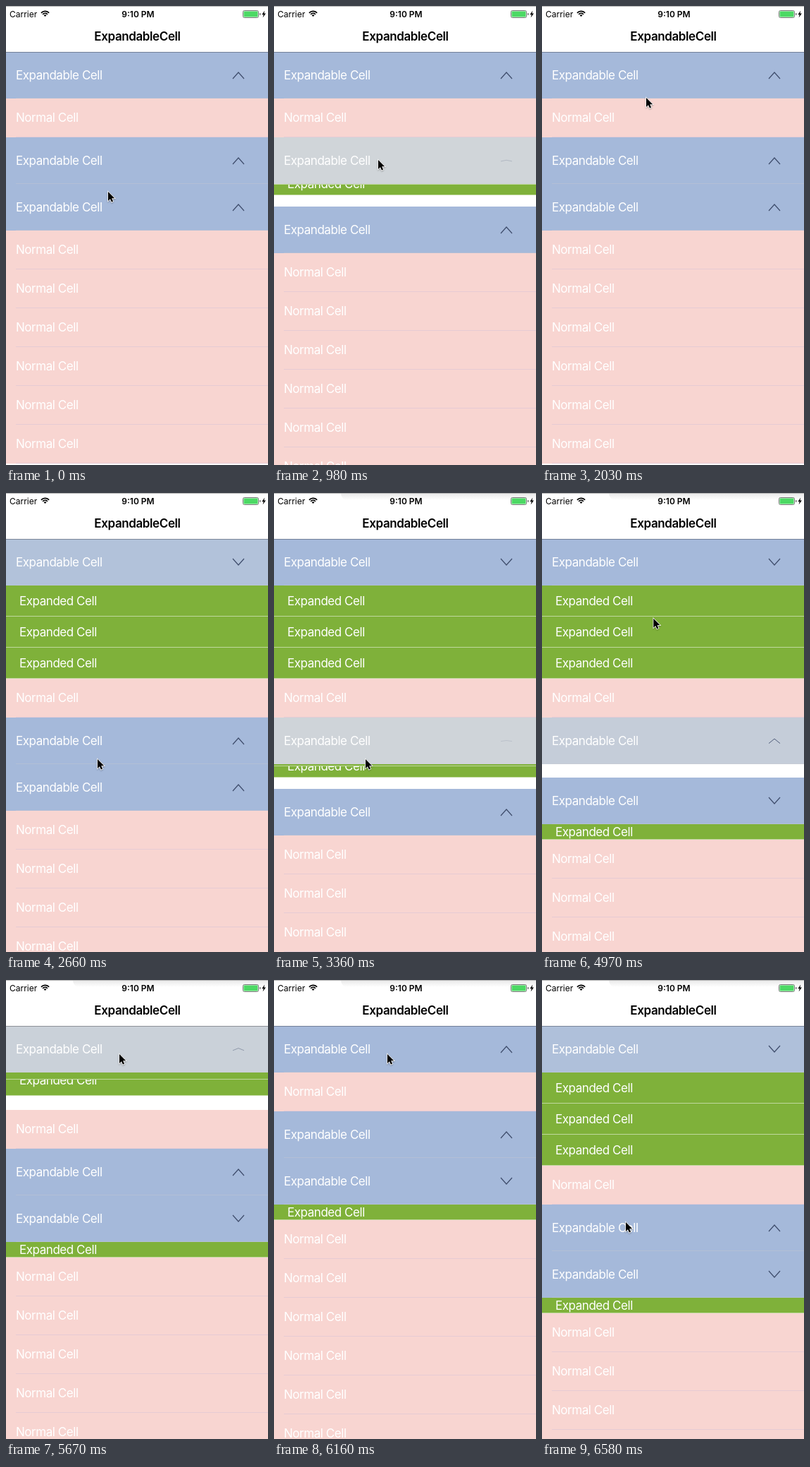
These frames come from a looping animation (372 px wide and 650 px high, 6650 ms). An HTML page with a canvas:

```html
<!DOCTYPE html>
<html lang="en">
<head>
<meta charset="utf-8">
<title>Expandable cells</title>
<style>
  html, body { margin: 0; width: 100%; height: 100%; overflow: hidden; background: #fff; }
  canvas { display: block; }
</style>
</head>
<body>
<canvas id="stage" width="372" height="650"></canvas>
<script>
const ctx = document.getElementById('stage').getContext('2d');
const W = 372, H = 650, LOOP = 6650, STEP = 70;
const OPEN_MS = 300, FADE_MS = 550, DWELL_MS = 125, TRAVEL_MS = 200;
const BLUE = [165, 185, 218], GREY = [213, 216, 217];
const PINK = '#f8d5d1', GREEN = '#7fb13a';
const FONT = 'Inter, "Liberation Sans", sans-serif';

const groups = [{ rowHeight: 44, rows: 3 }, { rowHeight: 33, rows: 3 }, { rowHeight: 22, rows: 1 }];

// Each stop of the pointer: time, group clicked (-1: none), x, y
const stops = [
  [505, -1, 145, 263], [865, 1, 148, 218], [1490, 1, 148, 218],
  [2300, 0, 148, 130], [3239, 1, 130, 377], [4200, 2, 150, 510],
  [4754, 1, 152, 350], [5500, 0, 161, 105], [6195, 0, 161, 105],
  [LOOP, -1, 119, 343]
];

const clamp = x => Math.max(0, Math.min(1, x));
const ease = x => x * x * (3 - 2 * x);
const easeOut = x => x * (2 - x);
const lerp = (a, b, p) => a + (b - a) * p;

function rect(color, x, y, w, h) {
  ctx.fillStyle = color;
  ctx.fillRect(x, y, w, h);
}

function text(str, x, y, { size = 17, weight = 400, color = '#fff', align = 'left', spacing = -0.45 } = {}) {
  ctx.font = `${weight} ${size}px ${FONT}`;
  ctx.letterSpacing = spacing + 'px';
  ctx.textAlign = align;
  ctx.fillStyle = color;
  ctx.fillText(str, x, y);
}

function polygon(points) {
  ctx.beginPath();
  points.forEach(([x, y]) => ctx.lineTo(x, y));
  ctx.closePath();
}

// Each click toggles its group; the latest one decides the pose
function groupState(id, t) {
  const done = stops.filter(([time, group]) => group === id && time <= t);
  if (!done.length) return { open: 0, arrow: 1, glow: 0 };
  const opening = done.length % 2 === 1;
  const age = t - done.at(-1)[0];
  const x = clamp(age / OPEN_MS), p = ease(x);
  const turn = Math.cos(Math.PI * x ** 0.85);
  return {
    open: opening ? p : 1 - p,
    arrow: opening ? turn : -turn,
    glow: 1 - ease(clamp(age / FADE_MS))
  };
}

function chevron(y, dir) {
  ctx.beginPath();
  ctx.moveTo(322, y + 4.5 * dir);
  ctx.lineTo(330, y - 4.5 * dir);
  ctx.lineTo(338, y + 4.5 * dir);
  ctx.strokeStyle = '#3f4d6c';
  ctx.lineWidth = 1.2 * Math.abs(dir);
  ctx.stroke();
}

function expandable(id, y, t) {
  const { open, arrow, glow } = groupState(id, t);
  const { rowHeight, rows } = groups[id];
  const bottom = y + 66, space = Math.round(rowHeight * rows * open);
  const mix = BLUE.map((c, i) => Math.round(lerp(c, GREY[i], glow)));
  rect(`rgb(${mix})`, 0, y, W, 66);
  rect('rgba(200,199,204,.4)', 14, bottom - 1, W - 14, 1);
  text('Expandable Cell', 14, y + 39);
  chevron(y + 33 + 0.5 * arrow, arrow);

  // Rows slide out from under the cell, earlier rows on top
  ctx.save();
  ctx.beginPath();
  ctx.rect(0, bottom, W, space);
  ctx.clip();
  for (let i = rows - 1; i >= 0; i--) {
    const hidden = -rowHeight * (1.75 + 0.2 * (rows - 1 - i));
    const top = Math.round(bottom + lerp(hidden, rowHeight * i, open));
    rect(GREEN, 0, top, W, rowHeight);
    rect('rgba(255,255,255,.5)', 0, top + rowHeight - 1, W, 1);
    text('Expanded Cell', 19, top + Math.round(rowHeight / 2) + 6);
  }
  ctx.restore();
  return bottom + space;
}

function normal(y) {
  rect(PINK, 0, y, W, 55);
  rect('#e6cbd4', 14, y + 54, W - 14, 1);
  text('Normal Cell', 14, y + 33);
  return y + 55;
}

function wifi(x, y) {
  const from = -Math.PI * 0.76, to = -Math.PI * 0.24;
  ctx.strokeStyle = ctx.fillStyle = '#000';
  ctx.lineWidth = 1.7;
  for (const r of [4.6, 7.6]) {
    ctx.beginPath();
    ctx.arc(x, y, r, from, to);
    ctx.stroke();
  }
  ctx.beginPath();
  ctx.moveTo(x, y);
  ctx.arc(x, y, 2.6, from, to);
  ctx.fill();
}

function battery() {
  ctx.beginPath();
  ctx.roundRect(336.5, 6.5, 22, 10, 2);
  ctx.strokeStyle = '#777';
  ctx.lineWidth = 1;
  ctx.stroke();
  rect('#4cd964', 337.5, 7.5, 20, 8);
  rect('#777', 360, 10, 1.5, 3);
  polygon([[367.3, 6.5], [363.3, 12.2], [365.7, 12.2], [364.6, 16.5], [368.9, 10.6], [366.3, 10.6]]);
  ctx.fillStyle = '#000';
  ctx.fill();
}

function header(t) {
  rect('#fff', 0, 0, W, 65);
  rect('rgba(0,0,0,.3)', 0, 65, W, 1);
  if (t >= 2730) {
    const shade = ctx.createLinearGradient(0, 0, 0, 10);
    shade.addColorStop(0, '#e8e8e8');
    shade.addColorStop(1, '#fff');
    ctx.fillStyle = shade;
    ctx.beginPath();
    ctx.roundRect(95, 0, W, 10, [0, 0, 0, 9]);
    ctx.fill();
  }
  rect('#b4b4b4', 0, 0, W, 1);
  const status = { size: 12, color: '#000', spacing: 0 };
  text('Carrier', 5, 15.5, status);
  text('9:10 PM', 187.5, 15.5, { ...status, weight: 600, align: 'center' });
  wifi(55.5, 15);
  battery();
  text('ExpandableCell', 186.5, 49, { weight: 600, color: '#000', align: 'center', spacing: -0.4 });
}

// The pointer dwells at each stop, then hurries to the next
function pointer(t) {
  const next = stops.findIndex(([time]) => time > t);
  const to = stops[next], from = stops[Math.max(0, next - 1)];
  const p = easeOut(clamp((t - from[0] - DWELL_MS) / TRAVEL_MS));
  ctx.save();
  ctx.translate(lerp(from[2], to[2], p), lerp(from[3], to[3], p));
  ctx.scale(0.86, 0.86);
  polygon([[0, 0], [0, 15], [3.4, 11.8], [5.7, 17], [8.2, 15.9], [6, 10.9], [10.7, 10.7]]);
  ctx.shadowColor = 'rgba(0,0,0,.3)';
  ctx.shadowBlur = 2;
  ctx.shadowOffsetY = 1;
  ctx.strokeStyle = '#fff';
  ctx.lineWidth = 1.8;
  ctx.stroke();
  ctx.shadowColor = 'transparent';
  ctx.fillStyle = '#000';
  ctx.fill();
  ctx.restore();
}

function draw(t) {
  rect('#fff', 0, 0, W, H);
  let y = expandable(0, 65, t);
  y = normal(y);
  y = expandable(1, y, t);
  y = expandable(2, y, t);
  for (let i = 0; i < 6; i++) y = normal(y);
  header(t);
  pointer(t);
}

const begin = performance.now();
function tick() {
  const t = Math.max(0, performance.now() - begin) % LOOP;
  draw(Math.floor(t / STEP) * STEP);
  requestAnimationFrame(tick);
}
tick();
</script>
</body>
</html>
```
